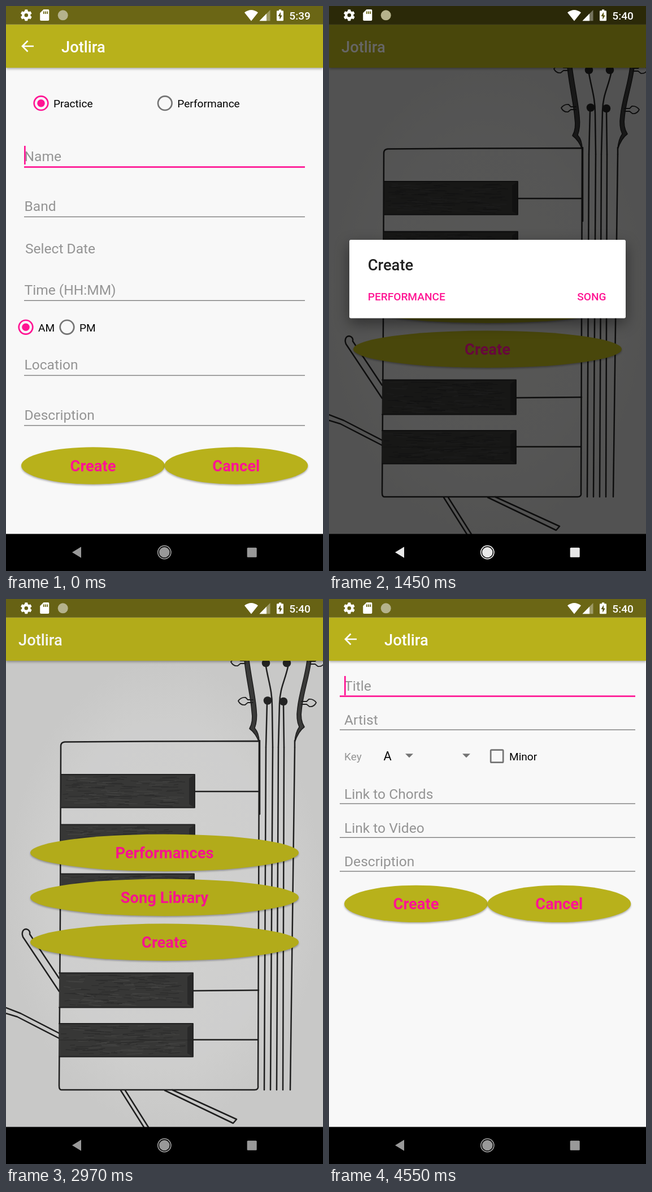
Recreate the animation shown at these times as an HTML page. Size 561 by 998 pixels, loop 5040 ms.

```html
<!DOCTYPE html>
<html lang="en">
<head>
<meta charset="utf-8">
<title>Jotlira</title>
<style>
  html, body { margin: 0; width: 100%; height: 100%; overflow: hidden; background: #000; }
  svg { display: block; width: 561px; height: 998px; font-family: Roboto, sans-serif; }
  .btn { filter: drop-shadow(0 2px 1.5px rgba(0, 0, 0, .3)); }
  .bar { filter: drop-shadow(0 2px 2px rgba(0, 0, 0, .32)); }
  .card { filter: drop-shadow(0 9px 13px rgba(0, 0, 0, .45)); }
  .ink { fill: none; stroke: #202020; stroke-width: 2.5; stroke-linecap: round; stroke-linejoin: round; }
</style>
</head>
<body>
<svg id="stage" viewBox="0 0 561 998"></svg>
<script>
const LOOP = 5040;
const OLIVE = '#b8b11b', PINK = '#ff1493', HINT = '#949494', GREY = '#747474';

const rect = (x, y, w, h, fill, more = '') =>
  `<rect x="${x}" y="${y}" width="${w}" height="${h}" fill="${fill}" ${more}/>`;
const circle = (x, y, r, fill, more = '') =>
  `<circle cx="${x}" cy="${y}" r="${r}" fill="${fill}" ${more}/>`;
const path = (d, fill, more = '') => `<path d="${d}" fill="${fill}" ${more}/>`;
const ink = (d, more = '') => `<path class="ink" d="${d}" ${more}/>`;
const text = (x, y, s, size, fill = '#000', weight = 400, anchor = 'start') =>
  `<text x="${x}" y="${y}" font-size="${size}" fill="${fill}" font-weight="${weight}" text-anchor="${anchor}">${s}</text>`;
const group = (id, body) => `<g id="${id}">${body}</g>`;

const button = (cx, cy, rx, label) =>
  `<ellipse class="btn" cx="${cx}" cy="${cy}" rx="${rx}" ry="32.7" fill="${OLIVE}"/>` +
  text(cx, cy + 10, label, 27.3, PINK, 700, 'middle');
const radio = (x, y, label, on) =>
  circle(x, y, 12.3, 'none', `stroke="${on ? PINK : GREY}" stroke-width="2.7"`) +
  (on ? circle(x, y, 6.8, PINK) : '') + text(x + 22, y + 7.2, label, 19.1);
const field = (x, w, tx, base, line, label, active) =>
  text(tx, base, label, 24.57, HINT) +
  (active ? rect(x, line - 1.3, w, 2.7, PINK) : rect(x, line - .7, w, 1.4, '#7d7d7d'));

function chrome(back) {
  const arrow = back
    ? `<path d="M49 71H29M38.5 61.5L29 71L38.5 80.5" fill="none" stroke="#fff" stroke-width="2.7"/>` : '';
  return rect(0, 32.7, 561, 76.4, OLIVE, 'class="bar"') + rect(0, 0, 561, 32.7, '#6b6615') + arrow +
    text(back ? 98 : 22, 81.5, 'Jotlira', 27.3, '#fff', 500) + rect(0, 932.5, 561, 166, '#000');
}

const page = fill => rect(0, 0, 561, 998, fill);

function eventForm() {
  const f = (...a) => field(32, 497, 32.5, ...a);
  return page('#f8f8f8') + chrome(true) +
    radio(62, 171.7, 'Practice', true) + radio(281.3, 171.7, 'Performance') +
    f(273.7, 284.4, 'Name', true) + rect(32, 247, 2.7, 33, PINK) +
    f(362, 372.4, 'Band') + text(34, 437, 'Select Date', 24.57, HINT) +
    f(510.3, 520.3, 'Time (HH:MM)') +
    radio(35, 567.3, 'AM', true) + radio(108, 567.3, 'PM') +
    f(642.3, 652.5, 'Location') + f(730.7, 741, 'Description') +
    button(154, 812, 127, 'Create') + button(407.3, 812, 127, 'Cancel');
}

function songForm() {
  const f = (...a) => field(19, 523, 27, ...a);
  const drop = x => path(`M${x} 273.3h14l-7 7z`, GREY);
  return page('#f8f8f8') + chrome(true) +
    f(162.3, 171.7, 'Title', true) + rect(27, 136, 2.7, 34, PINK, 'id="caret"') +
    f(222.3, 231, 'Artist') +
    text(27, 285, 'Key', 19.1, HINT) + text(96.5, 285.3, 'A', 21.8) + drop(135) + drop(236) +
    rect(286.2, 266.7, 22, 22, 'none', `stroke="${GREY}" stroke-width="2.7" rx="1.5"`) +
    text(319, 285, 'Minor', 19.1) +
    f(352.5, 361.5, 'Link to Chords') + f(412.5, 421.3, 'Link to Video') +
    f(472.3, 481, 'Description') +
    button(154, 538.4, 127, 'Create') + button(407.3, 538.4, 127, 'Cancel');
}

let seed = 7;
const rnd = () => (seed = seed * 16807 % 2147483647) / 2147483647;

// Short pencil strokes scattered inside a box.
function hatch(x, y, w, h, count, color) {
  let d = '';
  for (let i = 0; i < count; i++) {
    const len = 8 + rnd() * 24;
    d += `M${(x + rnd() * (w - len)).toFixed(1)} ${(y + rnd() * h).toFixed(1)}l${len.toFixed(1)} ${(rnd() * 4 - 2).toFixed(1)}`;
  }
  return `<path d="${d}" fill="none" stroke="${color}" stroke-width="1.1" opacity=".7"/>`;
}

// A pencil-shaded black key.
function key(x, y, r, h) {
  const w = r - x;
  return rect(x, y, w, h, '#393938') +
    hatch(x + 2, y + 4, w - 14, h - 8, 80, '#2a2a2a') +
    hatch(x + 2, y + 4, w - 14, h - 8, 45, '#4b4b49') +
    path(`M${r - 10} ${y + 7}L${r} ${y}V${y + h}L${r - 10} ${y + h - 6}z`, '#2b2b2b') +
    ink(`M${x} ${y}H${r}V${y + h}H${x}`, 'style="stroke-width:1.8"');
}

function drawing() {
  const strings = [[460, 457], [472, 468], [482, 479], [492, 490], [511, 503]]
    .map(([a, b]) => `M${a} 262L${b} 867`).join('');
  const dots = [[460, 113], [497, 113], [463, 179.5], [491, 181]]
    .map(([x, y]) => circle(x, y, 7.3, '#242424')).join('');
  const peg = (x, y, s) =>
    `M${x} ${y - 3}h${-9 * s}l${-4 * s} -4q${-8 * s} -1 ${-13 * s} 6q${4 * s} 8 ${12 * s} 7l${5 * s} -4h${9 * s}`;
  const edge = d => path(d, '#3c3c3b', 'stroke="#202020" stroke-width="1.6" stroke-linejoin="round"');
  const paper = '<radialGradient id="paper"><stop offset="0" stop-color="#d9d9d8"/>' +
    '<stop offset=".7" stop-color="#d6d6d5"/><stop offset="1" stop-color="#cfcfce"/></radialGradient>';
  return paper + rect(0, 109, 561, 824, 'url(#paper)') +
    ink('M30 597L94 693M42 592L94 670M30 597C27 589 30 583 36 583C41 584 43 588 42 592') +
    ink('M0 722L26 732L94 767M0 732L20 738L94 776') +
    ink('M203 868L244 933M211 868L252 933M281 868L402 926L408 919L294 867') +
    ink('M104 252.5L270 251.5L448 251L447 560L446 860Q447 867 440 867H98Q94 867 94 860L96 560L97 260Q97 253 104 252.5') +
    key(98, 310, 334, 58.5) + key(97, 398.5, 334, 58) + key(96, 485.5, 333, 59) +
    key(94, 660.5, 331, 61) + key(94, 750, 331, 58.5) +
    ink('M334 340H447M334 428H447M333 515H447M332 692L447 691M331 778.5H446') +
    ink('M94 779H331', 'opacity=".6" style="stroke-width:1.2"') +
    ink(strings) + ink('M449 250L449 380') +
    ink('M462 184L460 262M459 113C464 145 471 160 471 190L472 262M500 115C494 145 485 155 484 185L482 262M491 184L492 262') +
    edge('M422 108C425 140 433 170 435 198Q438 217 431 229Q442 237 448 253Q448 237 440 228Q445 214 443 196C441 170 434 140 430 108z') +
    edge('M540 108C536 140 526 165 523 195Q520 214 528 226Q517 234 511 253Q512 236 519 226Q513 213 516 193C519 165 529 140 533 108z') +
    ink('M511 250V262') +
    ink(peg(437, 181, 1) + peg(424, 112, 1) + peg(523, 184, -1) + peg(538, 113, -1), 'style="stroke-width:1.8"') + dots;
}

const home = () => page('#d6d6d4') + drawing() + chrome(false) +
  button(280.5, 448.2, 237.5, 'Performances') +
  button(280.5, 527.2, 237.5, 'Song Library') +
  button(280.5, 606.2, 237.5, 'Create');

const dialog = () => rect(36, 413, 489, 138.5, '#fff', 'rx="2.7" class="card"') +
  text(68.8, 466.5, 'Create', 27.3, '#212121', 500) +
  text(68.8, 520.3, 'PERFORMANCE', 19.1, PINK, 500) +
  text(490.5, 520.3, 'SONG', 19.1, PINK, 500, 'end');

function statusIcons() {
  let teeth = '';
  for (let a = 0; a < 360; a += 60)
    teeth += rect(33.2, 6.3, 5.2, 6, '#fff', `rx="1" transform="rotate(${a} 35.8 16.3)"`);
  return teeth + circle(35.8, 16.3, 5.5, 'none', 'stroke="#fff" stroke-width="4.4"') +
    path('M66.5 6H74.5Q76.3 6 76.3 8V24Q76.3 26 74.5 26H62Q60.2 26 60.2 24V12.3z', '#fff') +
    path('M66 9.5h1.8v4.5H66zM69.2 9.5H71v4.5h-1.8zM72.3 9.5h1.8v4.5h-1.8z', '#6b6615') +
    circle(100.7, 16.3, 9, '#b5b28c') +
    path('M422 11.5Q434 2.5 446 11.5L434 26.5z', '#fff') +
    path('M467.5 7V26.3H448.5z', '#fff', 'opacity=".35"') + path('M461 13.6V26.3H448.5z', '#fff') +
    path('M483 6.2h4.2v2h2.6q1.2 0 1.2 1.2V25q0 1.3-1.2 1.3h-9.6q-1.2 0-1.2-1.3V9.4q0-1.2 1.2-1.2H483z', '#fff') +
    path('M486 10.5L481.5 18H484.3V24L488.8 16.4H486z', '#5a5512') +
    ['5:39', '5:40'].map((s, i) => group('clock' + i, text(501.3, 23.5, s, 19.1, '#fff', 500))).join('');
}

const navIcons = () => path('M117 965L133 955.2V974.8z', '#fff') +
  circle(280.3, 965, 11.6, 'none', 'stroke="#fff" stroke-width="1.7"') + circle(280.3, 965, 9.3, '#fff') +
  rect(426.7, 956.7, 17, 17, '#fff', 'rx="1.5"');

const $ = id => document.getElementById(id);
$('stage').innerHTML = group('event', eventForm()) + group('home', home()) +
  rect(0, 0, 561, 998, '#000', 'id="dim"') + group('dialog', dialog()) +
  group('song', songForm()) + group('status', statusIcons()) + group('nav', navIcons());

const part = Object.fromEntries(
  ['event', 'home', 'dim', 'dialog', 'song', 'caret', 'clock0', 'clock1', 'nav'].map(id => [id, $(id)]));
const show = (el, a) => {
  el.style.display = a > 0 ? '' : 'none';
  el.style.opacity = a;
};
const span = (t, from, len) => Math.min(1, Math.max(0, (t - from) / len));
const decel = (p, n) => 1 - (1 - p) ** n;
const smooth = p => .5 - Math.cos(Math.PI * p) / 2;

function draw(t) {
  const started = t >= 40;
  const open = span(t, 1070, 150), close = span(t, 2830, 150), slide = t - 3000;
  show(part.event, +!started);
  show(part.home, +(started && slide < 350));
  show(part.dim, .6 * (open - close));
  show(part.dialog, decel(open, 3) - decel(close, 3));
  show(part.song, decel(span(slide, 0, 200), 3));
  const y = 80 * (1 - decel(span(slide, 0, 350), 5));
  part.song.setAttribute('transform', `translate(0 ${y < .4 ? 0 : y.toFixed(2)})`);
  show(part.caret, +(t < 4050 || t >= 4550));
  show(part.clock0, +!started);
  show(part.clock1, +started);
  show(part.nav, started ? 1 - .4 * smooth(span(t, 980, 1500)) : .6);
}

const t0 = performance.now();
function tick() {
  draw((performance.now() - t0) % LOOP);
  requestAnimationFrame(tick);
}
tick();
</script>
</body>
</html>
```
